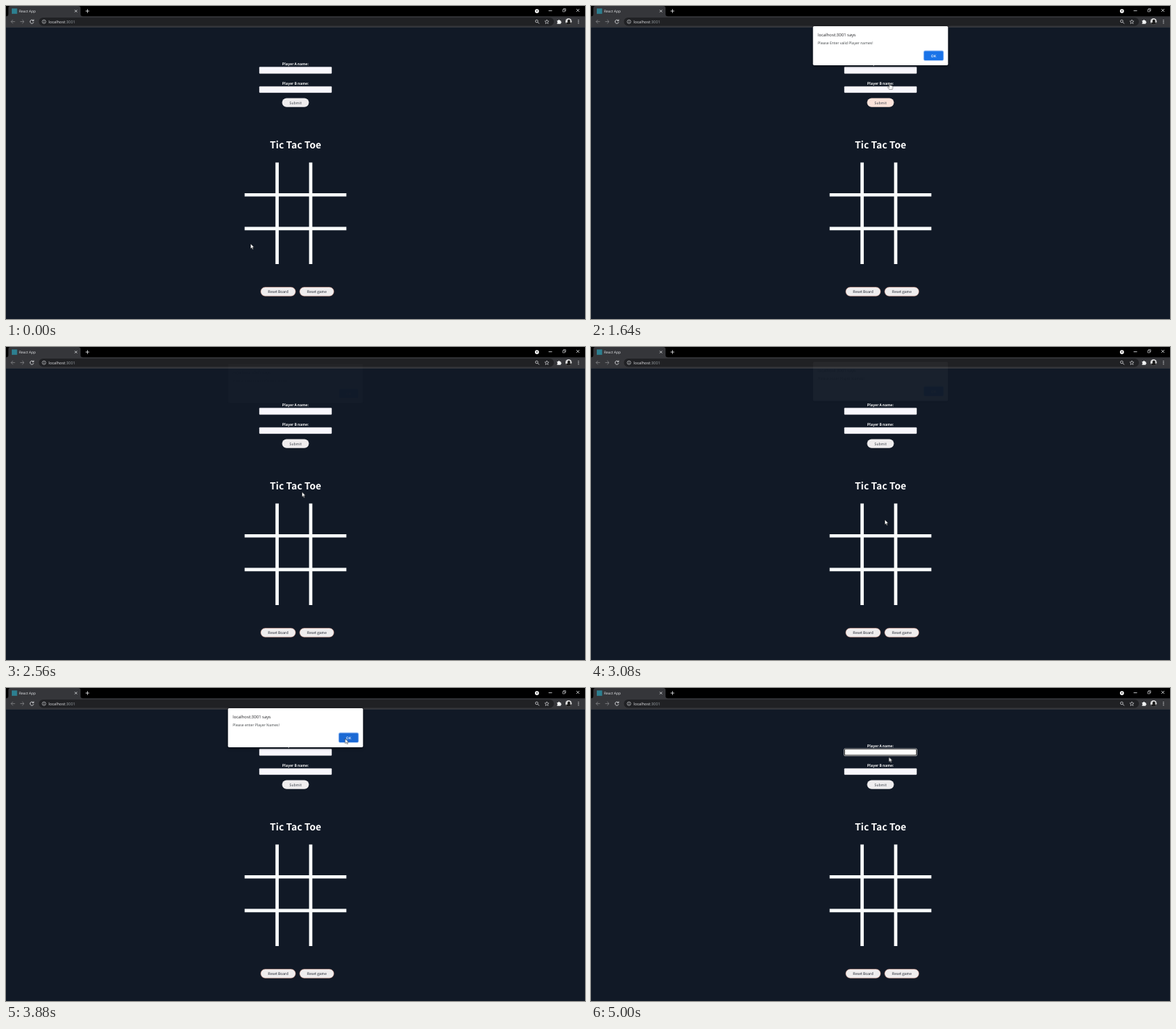
An HTML page that plays this animation: 800 by 433 pixels, repeating every 5080 ms.

```html
<!DOCTYPE html>
<html lang="en">
<head>
<meta charset="utf-8">
<title>Tic Tac Toe</title>
<style>
  html, body { margin: 0; width: 100%; height: 100%; overflow: hidden; background: #111926; }
  svg { display: block; width: 100%; height: 100%; }
  text { text-rendering: geometricPrecision; white-space: pre; }
  .ui { font-family: "Open Sans", "Noto Sans", sans-serif; }
  .page { font: 5px "Noto Sans CJK JP", "Noto Sans CJK SC", "Noto Sans CJK", "Noto Sans", sans-serif; text-anchor: middle; }
  .bold { font-weight: 700; fill: #fff; }
  .icon { fill: none; stroke: #e8eaed; stroke-width: .8; }
  .dim { stroke: #84868a; }
  .pill { fill: #efedee; }
  .reset { stroke: #e9a28f; stroke-width: .5; }
  .field { fill: #f8f7fd; stroke: #b9b9c0; stroke-width: .4; }
  #dialog { opacity: 0; filter: drop-shadow(0 1px 2px rgba(0, 0, 0, .45)); }
</style>
</head>
<body>
<svg viewBox="0 0 800 433">
  <rect width="800" height="433" fill="#111926"/>

  <!-- Browser window -->
  <g class="ui">
    <rect width="800" height="15" fill="#000"/>
    <path d="M0 14.2Q3.3 14.2 3.3 11V3Q3.3 0 6.3 0H100Q103 0 103 3V11Q103 14.2 106.3 14.2H800V29.3H0Z" fill="#35363a"/>
    <rect y="29" width="800" height=".6" fill="#3c3f45"/>
    <rect x="45.5" y="15.9" width="711.5" height="11.6" rx="5.8" fill="#202124"/>
    <rect x="8" y="3.4" width="7.4" height="7.4" fill="#2d7f90"/>
    <text x="18" y="8.9" font-size="4.9" fill="#e8eaed">React App</text>
    <text x="58.8" y="23.6" font-size="5.48" fill="#e8eaed">localhost<tspan fill="#9aa0a6">:3001</tspan></text>
    <g class="icon">
      <path d="M95 5.4l3.2 3.2m0-3.2l-3.2 3.2M109.9 7h5.2m-2.6-2.6v5.2"/>
      <path class="dim" d="M12.4 21.6H7m2.6-2.6L7 21.6l2.6 2.6M19.6 21.6H25m-2.6-2.6l2.6 2.6-2.6 2.6"/>
      <path d="M37.8 20.2A2.5 2.5 0 1 0 38.2 22.3M38.2 18.6v2h-2"/>
      <circle cx="52.5" cy="21.7" r="2.5" stroke-width=".6"/>
      <path d="M52.5 21.3v1.8m0-2.9v.6" stroke-width=".6"/>
      <circle cx="733.3" cy="21" r="1.8" stroke-width=".7"/>
      <path d="M734.7 22.4l2 2" stroke-width=".9"/>
      <path d="M747.3 18.9l.8 1.9 2 .2-1.5 1.4.5 2-1.8-1.1-1.8 1.1.5-2-1.5-1.4 2-.2z" stroke-width=".6"/>
      <path d="M749.7 6.6h4.8M788.2 4l4 4m0-4l-4 4"/>
      <path d="M769.2 4.9h3v3h-3zM770.3 4.7v-1h3v3h-1" stroke-width=".6"/>
    </g>
    <circle cx="733.6" cy="7" r="2.8" fill="#fff"/>
    <path d="M732.3 6.3h2.6l-1.3 1.6z" fill="#111"/>
    <path d="M761.5 20h1.5a1 1 0 0 1 2 0h1.5v1.4a1 1 0 0 1 0 2v1.4h-5v-1.5a1 1 0 0 0 0-1.8z" fill="#f1f3f4"/>
    <circle cx="777.3" cy="21.3" r="4.3" fill="#dcdcdc"/>
    <path d="M773.7 23.8Q775 22.3 776.5 22.3A2 2 0 1 1 779 22.3Q781 22.6 781 23.6A4.3 4.3 0 0 1 773.7 23.8Z" fill="#191919"/>
    <g fill="#e8eaed">
      <circle cx="791" cy="19.6" r=".65"/><circle cx="791" cy="21.7" r=".65"/><circle cx="791" cy="23.8" r=".65"/>
    </g>
  </g>

  <!-- Game page -->
  <g class="page">
    <text class="bold" x="400" y="81.8">Player A name:</text>
    <rect class="field" x="350" y="84.3" width="100" height="9.1" rx=".9"/>
    <g id="focus" opacity="0">
      <rect x="349.8" y="84" width="100.4" height="9.8" rx="1" fill="#101010" stroke="#fff" stroke-width=".6"/>
      <rect x="351" y="85.1" width="98" height="7.5" rx=".5" fill="#fff"/>
    </g>
    <text class="bold" x="400" y="108.9">Player B name:</text>
    <rect class="field" x="350" y="111.3" width="100" height="8.6" rx=".9"/>
    <rect id="submit" class="pill" x="381.5" y="127.4" width="37" height="12.3" rx="6.15"/>
    <text x="400" y="135.5" fill="#3d434c">Submit</text>
    <text class="bold" x="400" y="197.1" font-size="13.33">Tic Tac Toe</text>
    <path d="M372.3 216.5h4.6v140.6h-4.6zM418.7 216.5h4.6v140.6h-4.6zM329.7 259h140.6v4.6H329.7zM329.7 305.6h140.6v4.6H329.7z" fill="#f8fafa"/>
    <rect class="pill reset" x="352" y="389" width="48" height="12.2" rx="6.1"/>
    <text x="376.1" y="397" fill="#161c28">Reset Board</text>
    <rect class="pill reset" x="405.8" y="389" width="47.2" height="12.2" rx="6.1"/>
    <text x="429.5" y="397" fill="#161c28">Reset game</text>
  </g>

  <g id="dialog" class="ui" fill="#3c4043">
    <rect x="306.7" y="28" width="186.6" height="54" rx="1.7" fill="#fff"/>
    <text x="313.3" y="41.7" font-size="5.83" fill="#202124">localhost:3001 says</text>
    <text id="invalid" x="313.3" y="53.1" font-size="5.08">Please Enter valid Player names!</text>
    <text id="missing" x="313.3" y="53.1" font-size="5.08" opacity="0">Please enter Player Names!</text>
    <rect id="ring" x="459.4" y="61.6" width="28" height="14.2" rx="2.2" fill="#8fb8f3"/>
    <rect id="ok" x="460.2" y="62.4" width="26.4" height="12.6" rx="1.6" fill="#1a73e8"/>
    <text x="473.3" y="70.5" font-size="4.9" font-weight="600" fill="#fff" text-anchor="middle">OK</text>
  </g>

  <g id="cursor" stroke="#111" stroke-width=".45" fill="#fff" stroke-linejoin="round">
    <path id="arrow" d="M0 0V6.7L1.6 5.3 2.7 7.7 3.8 7.2 2.7 4.8H4.9Z"/>
    <path id="hand" opacity="0" d="M-.6 .6Q0-.4 .6 .6V3Q1.3 2.6 1.8 3.2 2.5 2.8 3 3.5 4.1 3.2 4.2 4.4V6.2L3.5 8.7H-.3L-2.5 5.6Q-2.6 4.4-1.5 4.8L-.6 5.6Z"/>
  </g>
</svg>
<script>
  const LOOP = 5080;
  const $ = id => document.getElementById(id);

  // steps: [ms, properties]; the first and last poses are held to the loop's ends
  function play(id, steps, easing = "linear") {
    const first = [0, steps[0][1]], last = [LOOP, steps.at(-1)[1]];
    const frames = [first, ...steps, last].map(([ms, props]) => ({ offset: ms / LOOP, easing, ...props }));
    $(id).animate(frames, { duration: LOOP, iterations: Infinity });
  }

  const toggle = (id, prop, off, on, spans) => play(id,
    [[0, { [prop]: off }], ...spans.flatMap(([a, b]) => [[a, { [prop]: on }], [b, { [prop]: off }]])],
    "steps(1, end)");

  const pose = (opacity, y) => ({ opacity, transform: `translateY(${y}px)` });
  const showDialog = (open, close) => [
    [open - 1, pose(0, -8)], [open, pose(.03, -7.5)], [open + 40, pose(.3, -5)],
    [open + 80, pose(.7, -2.5)], [open + 120, pose(.93, -1)], [open + 180, pose(1, 0)],
    [close - 40, pose(1, 0)], [close, pose(.91, -2.6)], [close + 40, pose(.6, -3.5)],
    [close + 80, pose(.25, -4)], [close + 120, pose(.02, -4.5)], [close + 140, pose(0, -4.5)]
  ];
  play("dialog", [...showDialog(1240, 2440), ...showDialog(3080, 4200)]);

  const path = [
    [80, 338, 329], [240, 347, 290], [400, 368, 220], [560, 386, 160], [720, 392, 140], [920, 395, 130],
    [1440, 395, 130], [1640, 412.5, 107], [1840, 436, 90], [2080, 464, 72], [2280, 470, 68], [2400, 469, 68],
    [2440, 460, 80], [2560, 409, 200.5], [2720, 407, 228], [2880, 406, 239],
    [3200, 406, 239], [3320, 408, 206.5], [3440, 424, 150], [3600, 455, 82], [3760, 467, 72], [4000, 470, 68],
    [4140, 467, 69], [4200, 460.5, 72.5], [4360, 430, 88], [4520, 411.6, 95.6]
  ];
  play("cursor", path.map(([ms, x, y]) => [ms, { transform: `translate(${x}px, ${y}px)` }]));

  const handTime = [[800, 1840]];
  toggle("hand", "opacity", 0, 1, handTime);
  toggle("arrow", "opacity", 1, 0, handTime);
  toggle("submit", "fill", "#efedee", "#fde3da", [[800, 2440]]);
  toggle("invalid", "opacity", 1, 0, [[2800, LOOP]]);
  toggle("missing", "opacity", 0, 1, [[2800, LOOP]]);
  toggle("ok", "fill", "#1a73e8", "#1b69d4", [[2080, 2600], [3720, 4400]]);
  toggle("ring", "opacity", 1, 0, [[2400, 2800], [4160, LOOP]]);
  toggle("focus", "opacity", 0, 1, [[4800, LOOP]]);
</script>
</body>
</html>
```
